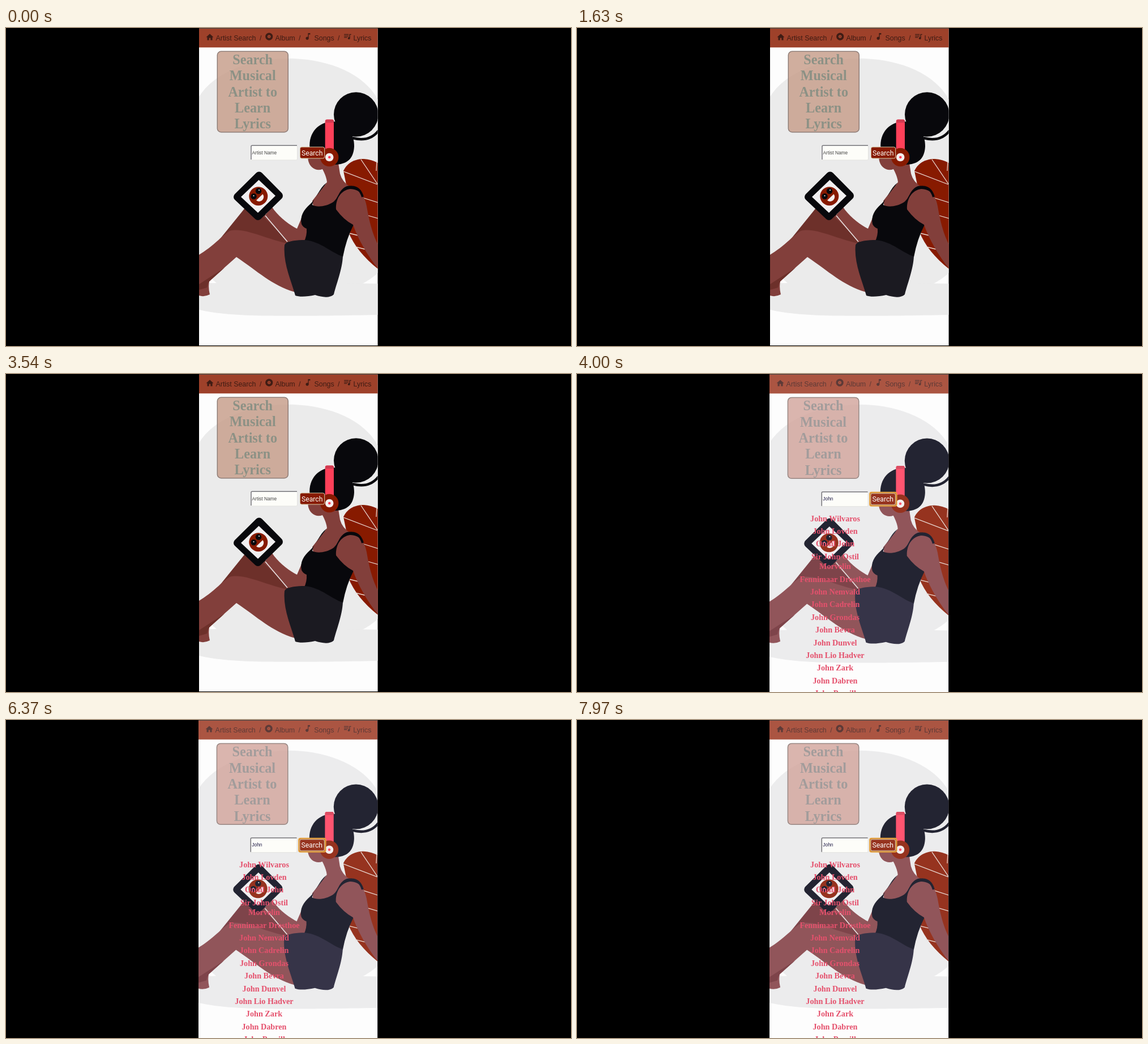
Animation, 998 px wide and 561 px high, one loop 8 s. Source, as an HTML page:

```html
<!DOCTYPE html>
<html lang="en">
<head>
<meta charset="utf-8">
<title>Lyrics search</title>
<style>
  html, body { margin: 0; width: 100%; height: 100%; overflow: hidden; background: #000; }
  svg { display: block; width: 100%; height: 100%; animation: results 8s step-end infinite; }

  /* Empty form, then a hard cut to the result list with a paler palette. */
  @keyframes results {
    0% {
      --paper: #fdfdfd; --grey: #ebebeb; --ink: #08080c; --shorts: #1b1a21;
      --skin: #823f3b; --shade: #6d302a; --maroon: #871a00; --pink: #ff4059; --cap: #d23a50;
      --nav: #9e412a; --navText: #3f1c14; --card: #c69c87; --cardText: #8c9185; --edge: #8f7d77;
      --before: 1; --after: 0; --fit: none;
    }
    49.8%, 100% {
      --paper: #fdfdfd; --grey: #ececed; --ink: #232432; --shorts: #363448;
      --skin: #91555a; --shade: #7e444a; --maroon: #96331f; --pink: #ff5570; --cap: #db4d62;
      --nav: #ab5542; --navText: #5d3a37; --card: #d3a49c; --cardText: #a29c9b; --edge: #988783;
      --before: 0; --after: 1; --fit: translate(-2.09px, 0) scale(1.0032, 1.0035);
    }
  }
  #page { transform: var(--fit); transform-origin: 0 0; }
  .before { opacity: var(--before); }
  .after { opacity: var(--after); }
  .paper { fill: var(--paper); } .grey { fill: var(--grey); } .ink { fill: var(--ink); }
  .shorts { fill: var(--shorts); } .skin { fill: var(--skin); } .shade { fill: var(--shade); }
  .maroon { fill: var(--maroon); } .pink { fill: var(--pink); }
  .nav { fill: var(--navText); font: 12.4px "Liberation Sans", Arial, sans-serif; }
  .title { fill: var(--cardText); font: bold 24.2px "Liberation Serif", Times, serif; text-anchor: middle; }
  .field { font: 8.4px "Liberation Sans", Arial, sans-serif; }
  .button { fill: #fff; font: 12.2px Roboto, sans-serif; text-anchor: middle; }
  #names { fill: #e5516d; font: bold 14.2px "Liberation Serif", Times, serif; text-anchor: middle; }
</style>
</head>
<body>
<svg viewBox="0 0 998 561" preserveAspectRatio="none">
  <clipPath id="screen"><path d="M341 .8H656.6V560H341z"/></clipPath>
  <rect width="998" height="561" fill="#000"/>
  <g id="page">
    <g clip-path="url(#screen)">
      <rect class="paper" x="341" width="316" height="561"/>

      <g class="grey">
        <path d="M341 121C398 31 604 30 657 126V432Q645 443 628 452H372Q355 441 341 427z"/>
        <path d="M341 450H600L657 451V506C560 508 500 508 460 507.500C410 507 370 504 341 497z"/>
      </g>
      <path class="paper" d="M341 450H372L358 438L341 440z"/>

      <!-- leaf -->
      <path class="maroon" d="M596 252C604 236 618 231 632 231Q646 232 657 238V425C632 405 614 383 605 360L612 330z"/>
      <path d="M596 253L656 276M627 232L656 275M655 234L654 252M632 300L657 308M640 331L657 336M606 362L630 368M617 386L637 391" fill="none" stroke="#e8d8d2" stroke-width="1.3"/>

      <!-- hair, face and neck -->
      <circle class="ink" cx="618.300" cy="152.500" r="39.300"/>
      <path d="M658 181Q642 202 612 194" fill="none" stroke="var(--ink)" stroke-width="4.500"/>
      <path class="skin" d="M538 205L533.500 232C536 247 548 253 559 249Q566 262 567 272L541 305L545 325L590 325L608 280Q594 272 590 257L587 238L575 210z"/>
      <path class="ink" d="M536.500 212C534 184 553 164 580 165C604 169 616 190 615 209C614 231 602 241 580 241Q567 235 563 212z"/>
      <rect class="pink" x="563.700" y="161.500" width="15.300" height="58" rx="3"/>
      <path d="M564 167V164.500Q564 161.500 567 161.500H576Q579 161.500 579 164.500V167z" fill="var(--cap)"/>
      <circle class="maroon" cx="571.200" cy="228" r="16.200"/>
      <circle cx="571.200" cy="228" r="7.300" fill="#f4efef"/>
      <circle class="pink" cx="571.300" cy="228" r="2.300"/>

      <!-- legs and forearm -->
      <path class="shade" d="M374 377L425 314L460 330L500 378V390L430 375z"/>
      <path class="skin" d="M455 333L470 316C480 331 498 346 514 354L526 326L536 360L528 380L500 380C488 365 470 348 455 333z"/>
      <path d="M458 331L497 377" stroke="#e9e3e3" stroke-width="1.600"/>
      <path class="skin" d="M341 400C365 386 382 366 395 358C420 351 455 371 497 380L514 467C470 455 446 430 407 404Q383 425 359 447Q357 458 360 470Q350 475 341 472z"/>
      <path class="shade" d="M341 452L386 423L359 447Q356 452 355 458L341 462z"/>

      <!-- top, arm and shorts -->
      <path class="ink" d="M566 273C553 283 549 300 538 310C525 321 519 333 522 346Q525 352 531 354Q532 366 526 378L595 404Q601 372 614 347L631 299C626 283 611 275 600 280C587 287 588 299 578 307C566 315 549 317 541 312C543 300 556 288 566 273z"/>
      <path class="skin" d="M583 320C582 301 592 286 608 284C626 284 634 298 637 314C643 350 650 368 657 382V424C640 404 621 371 613 347Q597 339 583 320z"/>
      <path d="M606 281Q624 278 630 298" fill="none" stroke="var(--ink)" stroke-width="4"/>
      <path class="shorts" d="M492 383C494 376 512 374 528 374C557 377 575 397 595 403C594 426 583 453 579 470C572 477 558 475 546 471C532 474 519 475 511 472C504 446 489 415 492 383z"/>

      <!-- tablet -->
      <path d="M447 260.500L482 296L445 332L409 298z" fill="#f1eff1" stroke="var(--ink)" stroke-width="14" stroke-linejoin="round"/>
      <path d="M446.500 268L476 296L445 326L415 298z" fill="#f1eff1"/>
      <circle class="maroon" cx="445.800" cy="296.700" r="16.500"/>
      <g class="ink"><circle cx="446" cy="287.500" r="5.200"/><circle cx="437.500" cy="297" r="5.200"/></g>
      <g fill="#fff"><circle cx="447" cy="286" r="1"/><circle cx="437.500" cy="296" r="1"/></g>
      <path d="M453.500 293A8 8 0 0 1 442 304z" fill="#f4efef"/>

      <!-- navigation -->
      <rect x="341" y="1" width="316" height="33.300" fill="var(--nav)"/>
      <g class="nav">
        <path transform="translate(352.200 8.400) scale(.65)" d="M10 20v-6h4v6h5v-8h3L12 3 2 12h3v8z"/>
        <path transform="translate(456.800 7.200) scale(.66)" fill-rule="evenodd" d="M12 2a10 10 0 1 0 .01 0zm0 5.500a4.500 4.500 0 1 1-.01 0zm0 3.500a1 1 0 1 1-.01 0z"/>
        <path transform="translate(525.500 7) scale(.66)" d="M12 3v10.550c-.59-.34-1.270-.55-2-.55-2.210 0-4 1.790-4 4s1.790 4 4 4 4-1.790 4-4V7h4V3z"/>
        <path transform="translate(595.200 6.800) scale(.66)" d="M15 6H3v2h12zm0 4H3v2h12zM3 16h8v-2H3zM17 6v8.180a3 3 0 1 0 2 2.820V8h3V6z"/>
        <text x="370.500" y="21.500">Artist Search</text><text x="448" y="21.500">/</text>
        <text x="475.500" y="22">Album</text><text x="517" y="22">/</text>
        <text x="544.500" y="22">Songs</text><text x="586" y="22">/</text>
        <text x="613.500" y="22">Lyrics</text>
      </g>

      <!-- title card -->
      <rect x="373.300" y="41.300" width="125" height="142.400" rx="6.500" fill="var(--card)" fill-opacity=".8" stroke="var(--edge)" stroke-width="1.500"/>
      <g class="title">
        <text x="435.700" y="64">Search</text>
        <text x="435.700" y="92.300">Musical</text>
        <text x="435.700" y="120.600">Artist to</text>
        <text x="435.700" y="148.900">Learn</text>
        <text x="435.700" y="177.200">Lyrics</text>
      </g>

      <!-- form -->
      <rect x="432.500" y="207" width="82" height="26" rx="2" fill="#fdfdf9" stroke="#e2e2df"/>
      <path d="M433 232V209Q433 207.300 435 207.300H514" fill="none" stroke="#77767c" stroke-width="1.500"/>
      <g class="field">
        <text class="before" x="434.500" y="222.700" fill="#454545">Artist Name</text>
        <text class="after" x="435" y="222.700" fill="#1c1844">John</text>
      </g>
      <rect class="after" x="517.600" y="208" width="47.200" height="24" rx="3" fill="#b66c32" stroke="#e5a03c" stroke-width="2"/>
      <rect class="maroon" x="519.300" y="210" width="43.400" height="20" rx="3" stroke="#d8c9aa"/>
      <text class="button" x="540.700" y="224.700">Search</text>
    </g>
  </g>
  <g id="names" class="after"></g>
  <path class="after" d="M656.500 0V561" stroke="#2c2c31"/>
</svg>
<script>
  const names = ["John Wilvaros", "John Lovden", "Ondil John", "Sir John Ostil|Morvelin",
    "Fennimaar Drosthoe", "John Nemvald", "John Cadrelin", "John Grondas", "John Bevra",
    "John Dunvel", "John Lio Hadver", "John Zark", "John Dabren", "John Pervill"];
  const rowGap = 22.4, wrapGap = 17.4;
  const list = document.getElementById("names");
  let y = 259.6;

  function addLine(text) {
    const line = document.createElementNS(list.namespaceURI, "text");
    line.setAttribute("x", 456);
    line.setAttribute("y", y);
    line.textContent = text;
    list.append(line);
  }

  for (const name of names) {
    name.split("|").forEach((part, i) => {
      if (i) y += wrapGap;
      addLine(part);
    });
    y += rowGap;
  }
</script>
</body>
</html>
```
